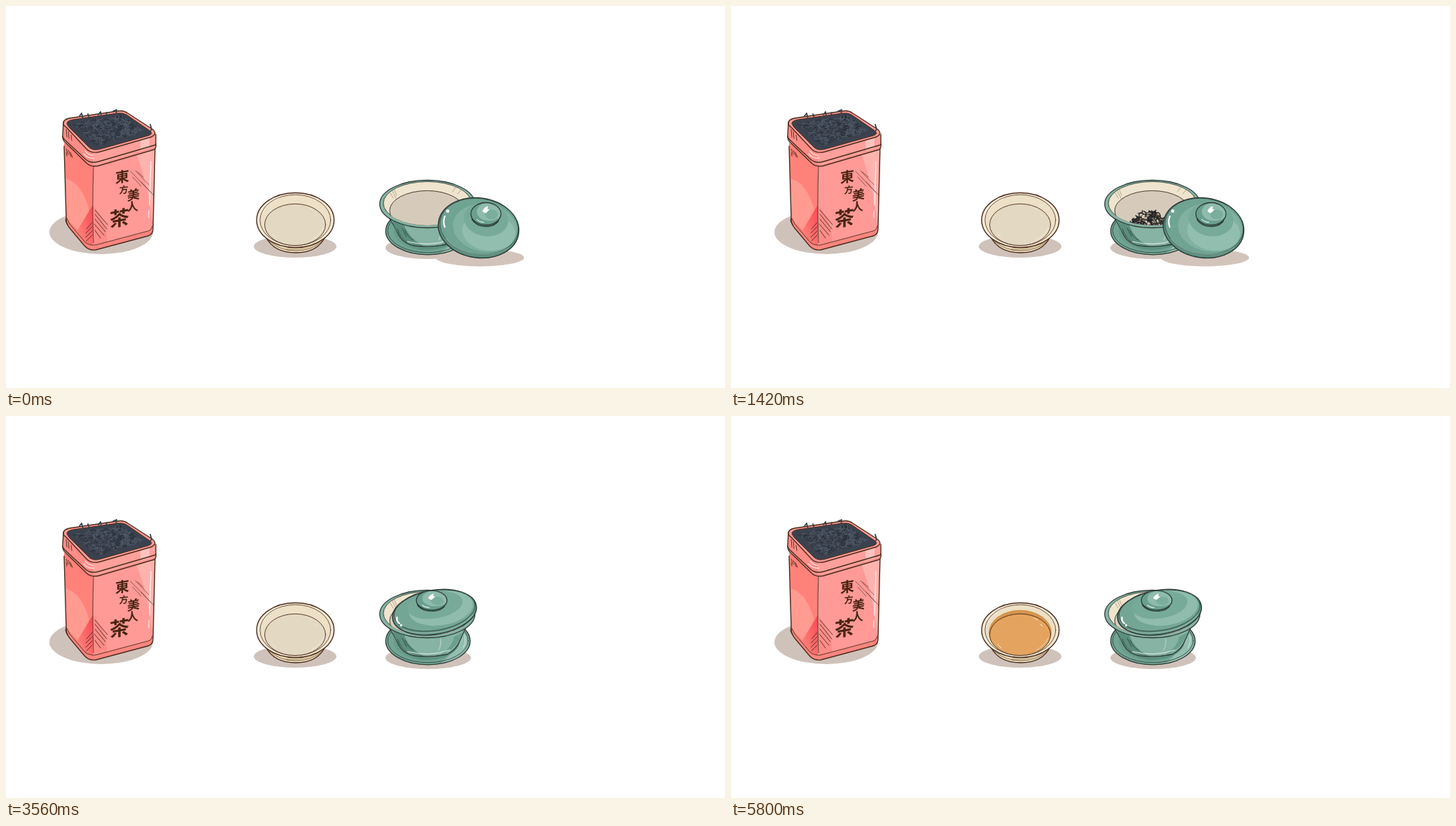
An HTML page for the animation above (6700 ms loop, 1027 px wide and 545 px high).

```html
<!DOCTYPE html>
<html lang="zh-Hant">
<head>
<meta charset="utf-8">
<title>Tea brewing</title>
<style>
html, body { margin: 0; width: 100%; height: 100%; overflow: hidden; background: #fff; }
svg { display: block; width: 100%; height: 100%; }
path, ellipse { stroke-linecap: round; stroke-linejoin: round; }
.tin, .tin-shadow, .fall, .pile, .kettle, .stream, .water, .side-lid, .top-lid,
.glint, .bowl, .pour, .tea, .tea-size { animation: 6.7s step-end infinite; }
.fall, .pile, .kettle, .stream, .water, .top-lid, .glint, .pour, .tea { visibility: hidden; }

.line { fill: none; stroke: #4b2c1c; stroke-width: 1.4; }
.thin { fill: none; stroke: #4b2c1c; stroke-width: .9; }
.fine { fill: none; stroke: #4b2c1c; stroke-width: .6; }
.rim { fill: none; stroke: #2d3a36; stroke-width: 1.3; }
.hair { fill: none; stroke: #2d3a36; stroke-width: .8; }
.steel { fill: none; stroke: #3a2c30; stroke-width: 2.1; }
.seam { fill: none; stroke: #3a2c30; stroke-width: 1.4; }
.shine { fill: none; stroke: #fff; }
.label { font: 700 20px "Noto Sans CJK TC", "Noto Sans CJK SC", "Noto Sans CJK JP", "Noto Sans CJK", sans-serif;
  fill: #4a2412; text-anchor: middle; }

.tin { animation-name: tin; transform-origin: 125px 348px; }
@keyframes tin {
  10.896% { transform: translate(280px, -207px) rotate(76deg); }
  21.194% { transform: none; }
}
.tin-shadow { animation-name: lifted; }
@keyframes lifted { 10.896% { visibility: hidden; } 21.194% { visibility: visible; } }

.fall { animation-name: fall; }
@keyframes fall {
  12.836% { visibility: visible; transform: translateY(0); animation-timing-function: steps(5, end); }
  17.164% { visibility: hidden; transform: translateY(150px); }
}
.pile { animation-name: pile; transform-origin: 598px 312px; }
@keyframes pile {
  0% { transform: scale(.35); }
  14.5% { visibility: visible; transform: scale(.5, .4); }
  15.4% { visibility: visible; transform: scale(.7, .6); }
  16.3% { visibility: visible; transform: scale(.85); }
  17.164% { visibility: visible; transform: none; }
  36.567%, 100% { visibility: hidden; transform: none; }
}

.kettle { animation-name: kettle; transform-origin: 775px 130px; }
@keyframes kettle {
  0% { transform: rotate(8deg); }
  22.687% { visibility: visible; transform: rotate(8deg); }
  25.224% { visibility: visible; transform: none; }
  39.104% { visibility: visible; transform: rotate(8deg); }
  40.597%, 100% { visibility: hidden; transform: rotate(8deg); }
}
.stream { animation-name: stream; }
@keyframes stream { 27.164% { visibility: visible; } 36.567% { visibility: hidden; } }
.water { animation-name: water; transform-origin: 603px 313px; }
@keyframes water {
  27.164% { visibility: visible; transform: scale(.7, .58); }
  30.149% { visibility: visible; transform: scale(.85, .8); }
  33.134% { visibility: visible; transform: none; }
  36.567%, 100% { visibility: hidden; transform: none; }
}

.side-lid { animation-name: side-lid; }
@keyframes side-lid { 36.567%, 100% { visibility: hidden; } }
.top-lid { animation-name: top-lid; transform-origin: 612px 280px; }
@keyframes top-lid {
  36.567% { visibility: visible; transform: translate(-10px, 1px) rotate(7deg); }
  53.134%, 100% { visibility: visible; transform: none; }
}
.glint { fill: none; stroke: #e6f3ee; stroke-width: 1.4; animation-name: glint; }
.g2 { animation-name: glint2; }
.g3 { animation-name: glint3; }
@keyframes glint { 40.597% { visibility: visible; } 53.134% { visibility: hidden; } }
@keyframes glint2 { 43.134% { visibility: visible; } 53.134% { visibility: hidden; } }
@keyframes glint3 { 46.119% { visibility: visible; } 53.134% { visibility: hidden; } }

.bowl { animation-name: bowl; transform-origin: 608px 264px; }
@keyframes bowl {
  60.149% { transform: translate(-70px, -65px) rotate(-17deg); }
  67.164% { transform: translate(-120.5px, -73px) rotate(-35deg); }
  86.567% { transform: none; }
}
.pour { animation-name: pour; }
@keyframes pour { 68.209% { visibility: visible; } 77.612% { visibility: hidden; } }
.tea { animation-name: tea; }
@keyframes tea { 68.209%, 100% { visibility: visible; } }
.tea-size { animation-name: tea-size; transform-origin: 413px 341px; }
@keyframes tea-size {
  0% { transform: scale(.47); }
  73.134% { transform: scale(.47); animation-timing-function: steps(10, jump-both); }
  77.612%, 100% { transform: none; }
}
</style>
</head>
<body>
<svg viewBox="0 0 1027 545" preserveAspectRatio="none">
  <defs>
    <clipPath id="inside"><ellipse cx="602" cy="281.5" rx="63" ry="31.5"/></clipPath>
    <clipPath id="above"><path d="M500 100H640V306H500Z"/></clipPath>
    <clipPath id="knob-clip"><ellipse rx="21.5" ry="16"/></clipPath>
    <linearGradient id="red" x1="0" y1="1" x2="1" y2="0">
      <stop offset=".25" stop-color="#ff7f78"/><stop offset="1" stop-color="#f9464f"/>
    </linearGradient>
    <g id="knob">
      <ellipse cx="-1" cy="4" rx="20" ry="14" fill="#47786a"/>
      <ellipse rx="21.5" ry="16" fill="#6a9f8f"/>
      <g clip-path="url(#knob-clip)">
        <ellipse cx="5" cy="-3" rx="18" ry="13" fill="#8ebbac"/>
        <ellipse cx="8" cy="1" rx="9" ry="7" fill="#7bad9d"/>
      </g>
      <ellipse rx="21.5" ry="16" class="rim"/>
      <path d="M-20 8Q-13 19 3 18Q13 17 18 10" class="rim"/>
      <path d="M-5-4Q-2-10 3-11L2-7L5-6L0-1L-3-2Z" fill="#fff"/>
      <path d="M-13 8Q-9 12-3 12" class="shine"/>
    </g>
  </defs>

  <!-- tea tin -->
  <ellipse class="tin-shadow" cx="136" cy="322.5" rx="74" ry="31.5" fill="#cfc2ba"/>
  <g class="tin">
    <path d="M83 195L86 304Q86 311 91 317L112 342Q118 349 128 348L203 328Q210 326 210 318L213 195L125 222Z" fill="#ff9a97"/>
    <path d="M83 195L86 304L90 316L113 343L124 347V222Z" fill="#ff827a"/>
    <path d="M85 246Q108 252 119 291L104 322L87 304Z" fill="#ff9b91"/>
    <path d="M124 284L99 325L113 340L124 344Z" fill="url(#red)"/>
    <path d="M126 286Q146 310 144 341L126 345Z" fill="#ff8b87"/>
    <path d="M186 211L212 203L209 312Q204 258 186 211Z" fill="#ffb3ae"/>
    <path d="M207 222L205 284M204 292V302" class="shine" stroke-width="1.4" opacity=".7"/>
    <path d="M86 301L89 310L113 337Q119 342 128 341L204 321L209 314L209 320Q209 326 203 328L128 348Q118 349 112 342L90 316Z" fill="#ff8580"/>
    <path d="M87 303L91 311L113 337Q119 342 128 341L203 321Q208 320 209 314" class="thin"/>
    <path d="M83 200L86 304Q86 311 91 317L112 342Q118 349 128 348L203 328Q210 326 210 318L213 200" class="line"/>
    <path d="M86 303Q84 306 88 312" class="line"/>
    <path d="M125 228Q123 280 125 338" class="thin"/>
    <path d="M178 236L211 270M185 235L204 255M181 244L193 257M193 251L207 266M188 237L196 244" class="fine"/>
    <path d="M127 291L145 312M127 297L144 318M127 304L142 322M126 311L140 327M127 320L135 331M115 318L123 309M114 324L123 315M114 330L123 321M115 335L123 327" class="thin"/>
    <path d="M86 204L89 212M89 206L93 215M92 209L95 216M86 209L87 214" class="thin"/>
    <!-- collar -->
    <path d="M82 166L81 188L84 193L116 225Q122 230 132 228L214 203V184L160 150Z" fill="#ff8c87"/>
    <path d="M124 208L214 184V202L130 227Q124 228 124 225Z" fill="#ffa09b"/>
    <path d="M192 191L205 187V202L192 206Z" fill="#ffc3be"/>
    <path d="M111 211Q117 218 126 217M113 207Q118 213 124 213" class="shine" stroke-width="1.4" opacity=".7"/>
    <path d="M82 166L81 184Q80 187 84 191L114 219Q121 225 132 222L214 198V183" class="line"/>
    <path d="M81 186Q81 191 84 194L116 225Q122 230 132 228L211 205Q215 203 214 197" class="line"/>
    <path d="M86 176L87 187M89 179L90 189M93 184L94 192" class="thin"/>
    <path d="M82 168Q81 162 91 160L159 150Q167 148 174 153L208 175Q218 182 207 187L134 208Q122 211 115 204L86 173Q82 170 82 168Z" fill="#ff9a95" stroke="#4b2c1c" stroke-width="1.4"/>
    <path d="M87 168Q86 164 96 162L159 153Q167 152 172 155L204 177Q212 182 203 185L135 204Q125 207 119 202L90 173Z" fill="#3b424e" stroke="#4b2c1c"/>
    <path id="leaf-a" fill="none" stroke="#2b313b" stroke-width="1"/>
    <path id="leaf-b" fill="none" stroke="#535e6d" stroke-width=".9"/>
    <path d="M110 161L108 153L105 157M119 160L117 154M136 157L135 151L132 155M142 158L144 152M157 156L158 148L153 150M204 181L208 176L206 169" fill="none" stroke="#3b424e" stroke-width="1.8"/>
    <g class="label">
      <text transform="translate(166 251) skewY(-10)">東</text>
      <text transform="translate(168 267) rotate(-6) skewX(-8)" style="font-size:13px">方</text>
      <text transform="translate(182 276) skewY(-12)" style="font-size:18px">美</text>
      <text transform="translate(181 292) rotate(-4)" style="font-size:16px">人</text>
      <text transform="translate(162 313) skewY(-10)" style="font-size:28px">茶</text>
    </g>
  </g>

  <!-- drinking cup -->
  <ellipse cx="413" cy="343" rx="59" ry="16" fill="#cfc2ba"/>
  <path d="M371 329Q382 352 414 352Q445 352 456 329Z" fill="#e9d9b8" stroke="#4b2c1c" stroke-width="1.4"/>
  <path d="M400 349Q432 349 449 337L440 337Q424 345 400 346Z" fill="#cdb995"/>
  <path d="M377 336Q391 349 414 349Q437 349 451 336" class="fine"/>
  <ellipse cx="413.3" cy="305.5" rx="55.3" ry="39" fill="#f4ead5" stroke="#4b2c1c" stroke-width="1.4"/>
  <ellipse cx="413.3" cy="305.5" rx="50.5" ry="36.3" fill="#ece0c6" stroke="#4b2c1c" stroke-width=".8"/>
  <ellipse cx="413" cy="312" rx="43.5" ry="29.7" fill="#e3d9c2"/>
  <g class="tea"><g class="tea-size">
    <ellipse cx="413" cy="309" rx="45" ry="32.3" fill="#d6954e"/>
    <ellipse cx="413" cy="312" rx="43" ry="29" fill="#e4a45f"/>
  </g></g>
  <ellipse cx="413" cy="312" rx="43.5" ry="29.7" class="thin"/>
  <path d="M366 296Q372 281 390 274M436 334Q449 327 453 317" class="shine" opacity=".5"/>
  <path d="M381 326L386 331M433 288L438 291M442 297L445 300" stroke="#f4ead5" fill="none"/>

  <!-- saucer -->
  <ellipse cx="603" cy="345" rx="61" ry="16" fill="#cfc2ba"/>
  <ellipse class="side-lid" cx="677" cy="359" rx="63" ry="12.5" fill="#d3c4bb"/>
  <ellipse cx="602.7" cy="321" rx="60.3" ry="33.8" fill="#72a494" stroke="#2d3a36" stroke-width="1.3"/>
  <path d="M634 293Q665 307 660 328Q652 347 622 352Q656 325 634 293Z" fill="#94bfb0"/>
  <ellipse cx="602.7" cy="320.5" rx="57.5" ry="31.3" class="hair"/>
  <ellipse cx="601" cy="320.5" rx="47" ry="28" fill="#5d8f7f"/>
  <path d="M554 321A47 28 0 0 1 595 292.5Q562 300 559 321Q562 343 600 349A47 28 0 0 1 554 321Z" fill="#699c8b"/>
  <path d="M655 313Q658 322 653 331" class="shine" opacity=".6"/>

  <!-- lidded bowl -->
  <g class="bowl">
    <path d="M545 299Q554 312 559 323Q566 339 584 342Q606 345 630 340Q644 333 649 319L658 299Z" fill="#86b3a3" stroke="#2d3a36" stroke-width="1.3"/>
    <path d="M552 306Q560 334 584 341L596 342Q574 331 568 310Z" fill="#5b8e7d"/>
    <path d="M618 342Q645 333 652 309L640 315Q638 330 618 342Z" fill="#6b9f8e"/>
    <path d="M559 318Q564 333 574 337M570 320Q574 330 582 334M566 317L572 329" class="hair"/>
    <path d="M573 336Q604 344 634 334" class="shine" opacity=".8"/>
    <path d="M621 318Q622 327 618 334" class="shine" opacity=".5"/>
    <ellipse cx="601.8" cy="282.5" rx="68" ry="34" fill="#86b3a3" stroke="#2d3a36" stroke-width="1.3"/>
    <ellipse cx="602" cy="281.5" rx="63" ry="31" fill="#efe4ce" stroke="#2d3a36" stroke-width=".9"/>
    <g clip-path="url(#inside)">
      <ellipse cx="601.5" cy="292" rx="53.5" ry="28.5" fill="#d6cbbb" stroke="#4b3a2c"/>
      <path d="M549 267L553 274M555 263L558 270M642 259L638 265M650 263L645 268M552 264L557 274" fill="none" stroke="#a9977f" stroke-width=".8"/>
      <g class="pile">
        <path id="pile-a" fill="none" stroke="#222326" stroke-width="1.6"/>
        <path id="pile-b" fill="none" stroke="#3c342d"/>
      </g>
      <g class="water">
        <ellipse cx="603" cy="300" rx="53" ry="27" fill="#e8d0ca" opacity=".62"/>
        <ellipse cx="605" cy="304" rx="42" ry="21" fill="#f0dcd7" opacity=".3"/>
      </g>
    </g>
    <g class="top-lid">
      <g transform="rotate(-9 612 280)">
        <ellipse cx="612" cy="280" rx="60.5" ry="31.6" fill="#5f9383" stroke="#2d3a36" stroke-width="1.5"/>
        <ellipse cx="612.5" cy="277.5" rx="58.5" ry="28.5" fill="#74a696" stroke="#2d3a36" stroke-width=".8"/>
        <ellipse cx="622" cy="276" rx="46" ry="24" fill="#90bcad"/>
        <ellipse cx="614" cy="270" rx="40" ry="19" fill="#78aa99"/>
        <path d="M563 297Q585 310 622 308.500Q650 306 666 292" class="shine" opacity=".4"/>
        <path d="M558 279Q556 284 560 288" class="shine" stroke-width="2.4"/>
        <circle cx="562" cy="291" r="1.6" fill="#fff"/>
      </g>
      <use href="#knob" transform="translate(608 263) scale(1.02 .86)"/>
      <path class="glint" d="M605 256Q611 251 619 255"/>
      <path class="glint g2" d="M619 255Q625 260 621 266"/>
      <path class="glint g3" d="M605 256Q597 260 599 267"/>
    </g>
  </g>

  <!-- lid resting beside the bowl -->
  <g class="side-lid">
    <g transform="rotate(8 675 316.5)">
      <ellipse cx="675" cy="316.5" rx="57.8" ry="42.7" fill="#5d9181" stroke="#2d3a36" stroke-width="1.5"/>
      <ellipse cx="675.5" cy="314.5" rx="56.3" ry="40" fill="#6fa392" stroke="#2d3a36" stroke-width=".7"/>
      <ellipse cx="684" cy="315" rx="46" ry="34" fill="#82b1a1"/>
      <ellipse cx="690" cy="320" rx="38" ry="27" fill="#92beaf"/>
      <ellipse cx="684" cy="303" rx="32" ry="24" fill="#78aa99"/>
      <path d="M631 338Q646 353 674 354.500Q705 354 722 338" class="shine" opacity=".3"/>
      <path d="M625 307Q623 315 627 322" class="shine" stroke-width="2.2"/>
      <circle cx="628" cy="299" r="2.4" fill="#fff"/>
    </g>
    <use href="#knob" x="685.5" y="296.5"/>
  </g>

  <g clip-path="url(#above)">
    <path id="falling" class="fall" fill="none" stroke="#343a45" stroke-width="1.6"/>
  </g>

  <!-- water and kettle -->
  <g class="stream">
    <path d="M650 144Q630 141 625 163Q616 222 597 291Q612 296 625 277Q628 220 635 172Q638 157 650 152Z" fill="#dfeff6" opacity=".7"/>
    <path d="M647 147Q634 148 631 166Q624 225 614 284L622 279Q625 222 632 170Q636 154 647 151Z" fill="#c3e2ef" opacity=".55"/>
    <path d="M628 167Q620 220 606 277" class="shine" opacity=".7"/>
  </g>
  <g class="kettle">
    <path d="M734 53Q743 12 770 5Q800 1 820 31Q838 60 854 106L838 97Q822 58 803 37Q780 14 763 28Q752 37 750 54Z" fill="#a9b9c6"/>
    <path d="M746 23Q756 5 778 5Q803 7 821 34Q838 62 849 94L841 88Q824 48 803 27Q776 5 748 26Z" fill="#383436"/>
    <path d="M741 51Q746 32 757 25" class="shine" stroke-width="2.600" opacity=".7"/>
    <path d="M734 53Q743 12 770 5Q800 1 820 31Q838 60 854 106M838 97Q822 58 803 37Q780 14 763 28Q752 37 750 54" class="steel"/>
    <path d="M853 109L863 107L880 119Q886 123 884 134L868 123Z" fill="#dbe6ef" stroke="#3a2c30" stroke-width="1.8"/>
    <path d="M672 127Q660 147 643 163Q643 168 649 167Q680 163 715 191Q690 165 672 127Z" fill="#b5c6d2" stroke="#3a2c30" stroke-width="2"/>
    <path d="M671 134Q662 150 650 162Q675 157 689 165Q678 151 671 134Z" fill="#dfebf2"/>
    <path d="M720 52Q795 52 871 122Q858 190 785 241L713 189Q686 165 671 125Z" fill="#d5e1e1"/>
    <path d="M720 52Q795 52 871 122L863 153Q790 90 710 78Z" fill="#b4c2c7"/>
    <path d="M671 125Q690 146 722 174L804 227L785 241L713 189Q686 165 671 125Z" fill="#bac7cb"/>
    <path d="M871 122L887 135Q892 139 889 145Q860 210 816 253Q808 259 801 253L785 241Q855 195 871 122Z" fill="#e7f0fa"/>
    <path d="M871 122L890 139L882 160L863 153Z" fill="#c5d4e1"/>
    <path d="M804 227L829 241L812 257L785 241Z" fill="#bccbd8"/>
    <path d="M871 122Q858 195 785 241" class="seam"/>
    <path d="M706 49L721 51Q692 84 671 125Q663 121 665 110Q680 77 699 54Q702 50 706 49Z" fill="#c9d7e1" stroke="#3a2c30" stroke-width="1.8"/>
    <path d="M704 54Q680 82 669 111Q670 116 673 114Q688 82 711 55Z" fill="#eef5fb"/>
    <path d="M715 52Q687 84 669 121" class="seam"/>
    <path d="M721 52Q795 53 871 122L887 135Q892 139 889 145Q860 210 816 253Q808 259 801 253L713 189Q686 165 671 125" class="steel"/>
  </g>

  <!-- poured tea -->
  <g class="pour">
    <path d="M434 246Q425 259 419 285Q414 309 412 329Q418 332 424 328Q424 293 431 269Q434 257 439 252Z" fill="#dd9d55" opacity=".9"/>
    <path d="M433 254Q424 279 419 322" fill="none" stroke="#f0c48a" stroke-width="1.6"/>
  </g>
</svg>
<script>
let seed = 7;
const rnd = (a, b) => {
  seed = (seed * 16807) % 2147483647;
  return a + (b - a) * seed / 2147483647;
};

// One curled leaf centred on x, y
function leaf(x, y, len) {
  const a = rnd(0, Math.PI), dx = Math.cos(a) * len, dy = Math.sin(a) * len * .7;
  return `M${x - dx} ${y - dy}Q${x + rnd(-3, 3)} ${y + rnd(-4, 4)} ${x + dx} ${y + dy}`;
}

function scatter(id, count, place) {
  let d = '';
  for (let i = 0; i < count; i++) d += leaf(...place());
  document.getElementById(id).setAttribute('d', d);
}

function inTin() {
  const u = rnd(.04, .96), v = rnd(.04, .96);
  return [93 + 72 * u + 36 * v, 167 - 12 * u + 34 * v - 10 * u * v, rnd(2, 5)];
}

function inBowl() {
  const u = rnd(-1, 1);
  return [597 + 25 * u, 313 - rnd(0, 22) * (1 - u * u * .75), rnd(2, 5)];
}

scatter('leaf-a', 190, inTin);
scatter('leaf-b', 150, inTin);
scatter('pile-a', 90, inBowl);
scatter('pile-b', 40, inBowl);
scatter('falling', 32, () => [rnd(582, 622), rnd(150, 215), rnd(3, 6)]);
</script>
</body>
</html>
```
